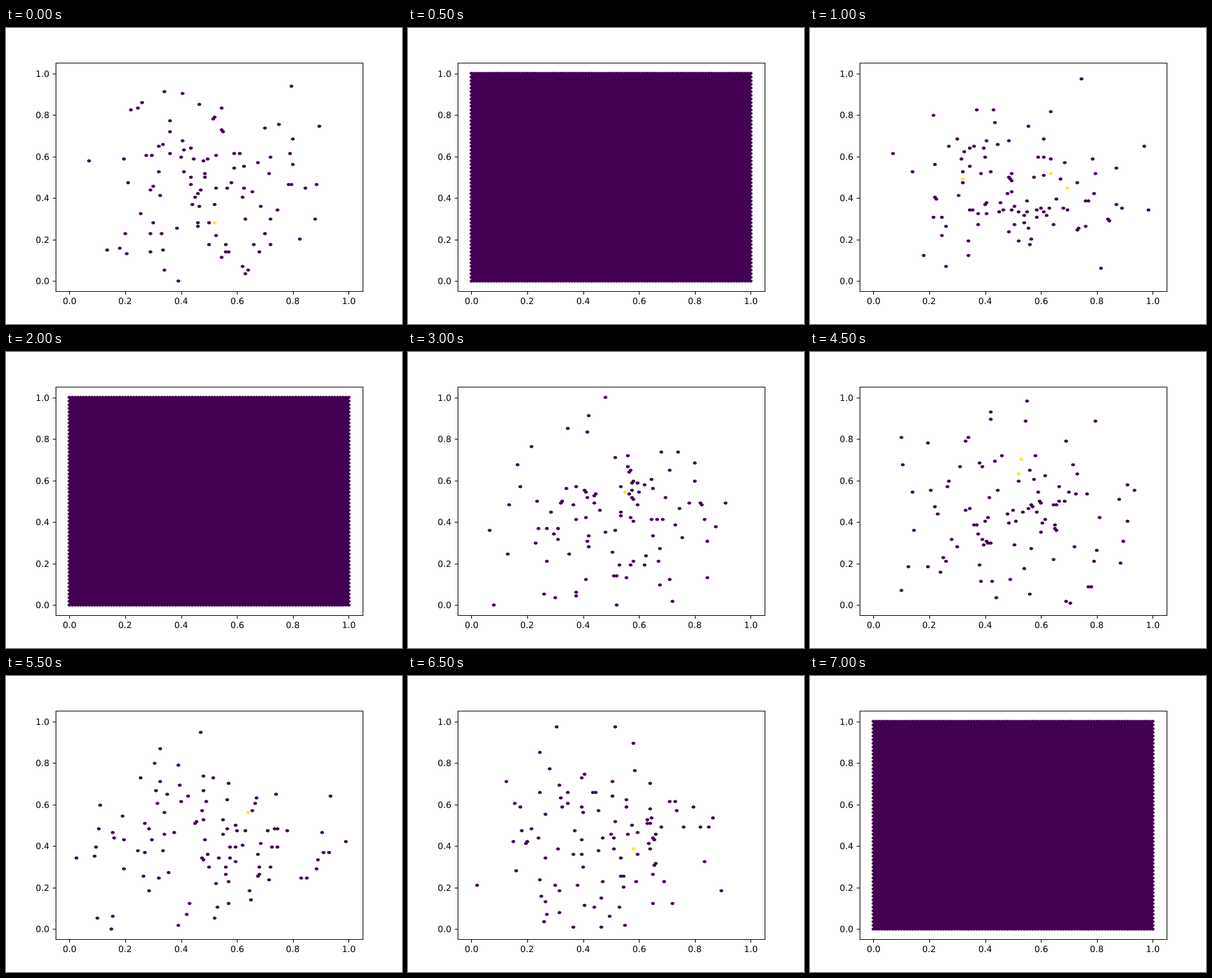
Recreate the animation shown at these times as an HTML page with a canvas. Size 614x460 px, loop 8 s.

```html
<!DOCTYPE html>
<html lang="en">
<head>
<meta charset="utf-8">
<title>Hexbin scatter</title>
<style>
  html, body { margin: 0; width: 100%; height: 100%; overflow: hidden; background: #fff; }
  svg, canvas { position: absolute; left: 0; top: 0; width: 614px; height: 460px; }
  text { font: 13.333px "DejaVu Sans", sans-serif; fill: #000; text-rendering: geometricPrecision; }
  path { fill: none; stroke: #000; stroke-width: 1.067; }
</style>
</head>
<body>
<canvas id="plot" width="614" height="460"></canvas>
<svg id="axes" viewBox="0 0 614 460"></svg>
<script>
const LOOP = 8000;
const DARK = '#440154', BRIGHT = '#fde725';
const COLS = 200, ROWS = 114;              // half-steps of the hexagon lattice
const X0 = 98.44, Y0 = 393.18, W = 432.87, H = 322.56;
const POINTS = 104;
const px = i => X0 + W * i / COLS;
const py = j => Y0 - H * j / ROWS;

// Each step is a seeded cloud with a few cells hit twice, or the full lattice.
const cloud = (at, seed, ...hot) => ({ at, cells: scatter(seed, hot), hot });
const full = at => ({ at, cells: lattice(), hot: [] });
const steps = [
  cloud(0, 1, [104, 32]),
  full(500),
  cloud(1000, 2, [64, 56], [127, 59], [139, 51]),
  cloud(1500, 3, [96, 54]),
  full(2000),
  cloud(3000, 4, [110, 62]),
  full(3500),
  cloud(4500, 5, [106, 80], [104, 72]),
  full(5000),
  cloud(5500, 6, [128, 64]),
  cloud(6000, 7, [90, 50]),
  cloud(6500, 8, [116, 44]),
  full(7000)
];

function randomizer(seed) {
  let s = seed * 7919;
  return () => {
    s = (s + 0x6D2B79F5) | 0;
    let t = Math.imul(s ^ (s >>> 15), 1 | s);
    t = (t + Math.imul(t ^ (t >>> 7), 61 | t)) ^ t;
    return ((t ^ (t >>> 14)) >>> 0) / 4294967296;
  };
}

// Normal distribution snapped to free lattice cells.
function scatter(seed, hot) {
  const rand = randomizer(seed);
  const gauss = () => Math.sqrt(-2 * Math.log(1 - rand())) * Math.cos(2 * Math.PI * rand());
  const used = new Set(hot.map(String));
  const cells = [];
  while (cells.length + hot.length < POINTS) {
    const i = Math.round(COLS * (0.5 + 0.21 * gauss()));
    const odd = i & 1;
    const j = odd + 2 * Math.round((ROWS * (0.43 + 0.23 * gauss()) - odd) / 2);
    const key = String([i, j]);
    if (i < 0 || i > COLS || j < 0 || j > ROWS || used.has(key)) continue;
    used.add(key);
    cells.push([i, j]);
  }
  return cells;
}

function lattice() {
  const cells = [];
  for (let i = 0; i <= COLS; i++)
    for (let j = i % 2; j <= ROWS; j += 2) cells.push([i, j]);
  return cells;
}

const ctx = document.getElementById('plot').getContext('2d');
const hw = W / COLS, hh = H / ROWS / 3;
const corners = [[hw, -hh], [hw, hh], [0, 2 * hh], [-hw, hh], [-hw, -hh], [0, -2 * hh]];

function hexes(cells, color) {
  ctx.fillStyle = ctx.strokeStyle = color;
  ctx.lineWidth = 1.333;
  ctx.lineJoin = 'round';
  for (const [i, j] of cells) {
    ctx.beginPath();
    for (const [dx, dy] of corners) ctx.lineTo(px(i) + dx, py(j) + dy);
    ctx.closePath();
    ctx.fill();
    ctx.stroke();
  }
}

function drawAxes() {
  const snap = v => Math.round(v) + 0.5;
  const label = (x, y, s) => `<text x="${Math.round(x)}" y="${Math.round(y)}">${s}</text>`;
  let d = 'M77.5 54.5H553.5V409.5H77.5Z', labels = '';
  for (let k = 0; k <= 5; k++) {
    const x = px(k * COLS / 5), y = py(k * ROWS / 5);
    const value = (k / 5).toFixed(1);
    d += `M${snap(x)} 409.5v5M77.5 ${snap(y)}h-5`;
    labels += label(x - 10.6, 429, value) + label(46, y + 5.07, value);
  }
  document.getElementById('axes').innerHTML = `<path d="${d}"/>${labels}`;
}

let shown;
function render(now) {
  const t = now % LOOP;
  const step = steps.filter(s => s.at <= t).pop();
  if (step === shown) return;
  shown = step;
  ctx.clearRect(0, 0, 614, 460);
  hexes(step.cells, DARK);
  hexes(step.hot, BRIGHT);
}

function tick() {
  render(performance.now());
  requestAnimationFrame(tick);
}

drawAxes();
tick();
</script>
</body>
</html>
```
